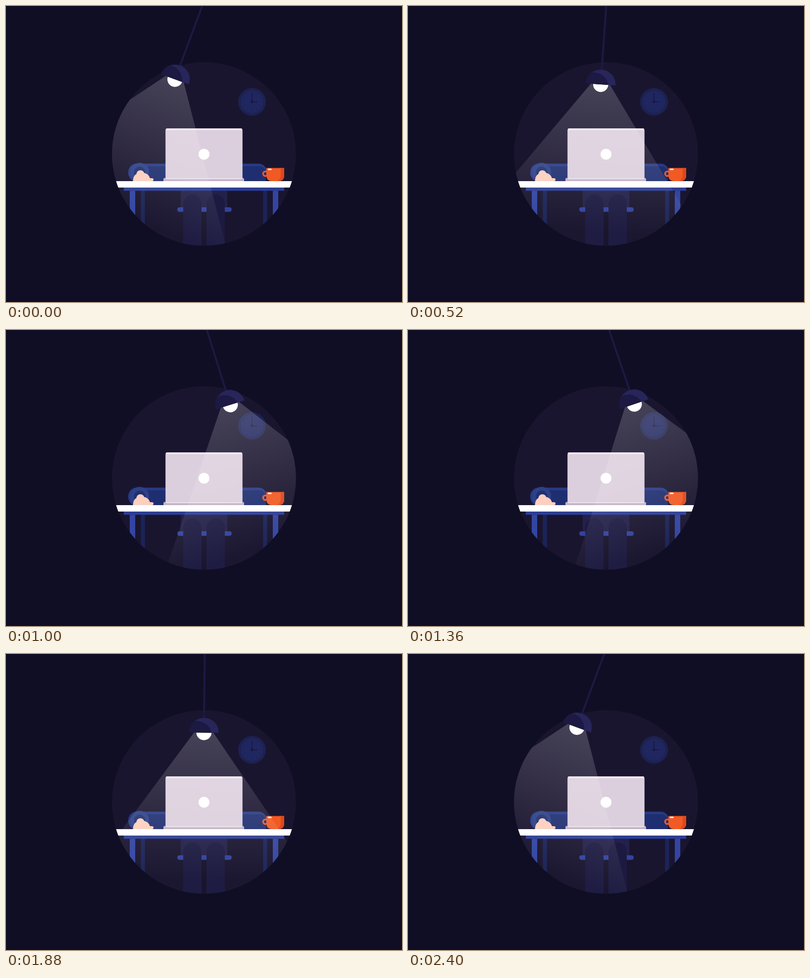
An HTML page that plays this animation: 800 by 600 pixels, repeating every 2.44 s.

```html
<!DOCTYPE html>
<html lang="en">
<head>
<meta charset="utf-8">
<title>Desk under a swinging lamp</title>
<style>
  html, body { margin: 0; width: 100%; height: 100%; overflow: hidden; background: #100e24; }
  svg { display: block; width: 100%; height: 100%; }
</style>
</head>
<body>
<svg viewBox="0 0 800 600">
  <defs>
    <clipPath id="room"><circle cx="400" cy="300" r="186"/></clipPath>
    <clipPath id="shade"><path d="M-30 173.4a30 30 0 0 1 60 0z"/></clipPath>
    <clipPath id="mug"><path id="mugShape" d="M526 328.5H562V343Q562 355 550 355H538Q526 355 526 343z"/></clipPath>
    <linearGradient id="light" gradientUnits="userSpaceOnUse" x1="0" y1="173" x2="0" y2="470">
      <stop offset="0" stop-color="#fff" stop-opacity=".19"/>
      <stop offset="1" stop-color="#fff" stop-opacity=".01"/>
    </linearGradient>
  </defs>

  <g clip-path="url(#room)">
    <circle cx="400" cy="300" r="186" fill="#1a152f"/>

    <g id="clock" transform="translate(497 194.3)">
      <circle r="28" fill="#1c2251"/>
      <circle r="22.5" fill="#20265f"/>
      <circle r="18.5" fill="none" stroke="#171a46" stroke-width="2" pathLength="120" stroke-dasharray="1.2 8.8" stroke-dashoffset=".6"/>
      <path d="M0 0V-18M0 0H11" stroke="#14163c" stroke-width="1.3"/>
      <circle r="2.5" fill="#14163c"/>
    </g>

    <g id="chair">
      <path d="M272.5 374h8v80h-8zM519.5 374h8v80h-8z" fill="#1b2458"/>
      <rect x="395" y="417" width="10" height="70" fill="#17132c"/>
      <rect x="353" y="374" width="94" height="35" fill="#232049"/>
      <rect x="346" y="408" width="110" height="9.3" rx="4.5" fill="#32429d"/>
      <path d="M358 490V400.5a18.5 18.5 0 0 1 37 0V490zM405 490V400.5a18.5 18.5 0 0 1 37 0V490z" fill="#1d1a41"/>
    </g>

    <g id="arms">
      <rect x="247" y="319.5" width="280" height="36" rx="17" fill="#283a86"/>
      <path d="M280 325H514Q525 327 525 340V355H270z" fill="#1f2e70"/>
      <circle cx="270" cy="337" r="19" fill="#2c4189"/>
      <circle cx="270" cy="337" r="11.5" fill="#21316f"/>
      <g fill="#fccfbf">
        <circle cx="271.5" cy="341" r="8"/>
        <path d="M256.5 355Q257 338 274 338T291.5 355z"/>
        <rect x="284" y="349" width="14" height="6" rx="3"/>
      </g>
    </g>

    <g id="laptop">
      <rect x="318" y="348.5" width="163" height="8" rx="3" fill="#c4b4c8"/>
      <rect x="322.5" y="248" width="155" height="103" rx="3" fill="#ece3ed"/>
      <path d="M322.5 252h155v97h-155z" fill="#dccfdd"/>
      <circle cx="400" cy="300.5" r="11" fill="#fff"/>
    </g>

    <g id="cup">
      <circle cx="524" cy="340" r="4.6" fill="none" stroke="#f05a24" stroke-width="3.4"/>
      <use href="#mugShape" fill="#f15a24"/>
      <g clip-path="url(#mug)" fill="#dc481c">
        <path d="M555 328H563V356H545Q555 352 555 343z"/>
        <path d="M526 328h36v1.4h-36z"/>
      </g>
      <rect x="529" y="329.8" width="7.5" height="2.8" rx=".8" fill="#fff"/>
    </g>

    <g id="desk">
      <path d="M238 368h324v6.5H238z" fill="#2c3e96"/>
      <path d="M250 374.5h11v80h-11zM539 374.5h11v80h-11z" fill="#3345a3"/>
      <path d="M210 355h380v13H210z" fill="#fff"/>
    </g>

    <path class="swing" d="M-20 173.4H19L261 523H-274z" fill="url(#light)"/>
  </g>

  <g class="swing">
    <path d="M0 0V146" stroke="#1c1942" stroke-width="4"/>
    <path d="M-15.3 173.4a15.3 15.3 0 0 0 30.6 0z" fill="#fff"/>
    <g clip-path="url(#shade)">
      <path d="M-31 140h62v40h-62z" fill="#28255a"/>
      <circle cx="-14" cy="180" r="30" fill="#1c1942"/>
    </g>
  </g>
</svg>
<script>
  const LOOP = 2440, HALF = 1200, STEP = 40;
  const SWING = 20.3;       // degrees to each side
  const END_SPEED = 0.62;   // the way back does not slow down completely
  const parts = document.querySelectorAll('.swing');

  // Cubic from 0 to 1 that starts at rest and ends with the given slope.
  const ease = (u, slope) => u * u * (3 - 2 * u + slope * (u - 1));

  function lampAngle(ms) {
    if (ms >= 2 * HALF) return -SWING;
    const progress = ms < HALF
      ? ease(ms / HALF, 0)
      : 1 - ease(ms / HALF - 1, END_SPEED);
    return SWING * (2 * progress - 1);
  }

  function draw() {
    const ms = Math.floor(performance.now() % LOOP / STEP) * STEP;
    const pose = `translate(401.5 -14) rotate(${-lampAngle(ms)})`;
    parts.forEach(part => part.setAttribute('transform', pose));
    requestAnimationFrame(draw);
  }
  draw();
</script>
</body>
</html>
```
